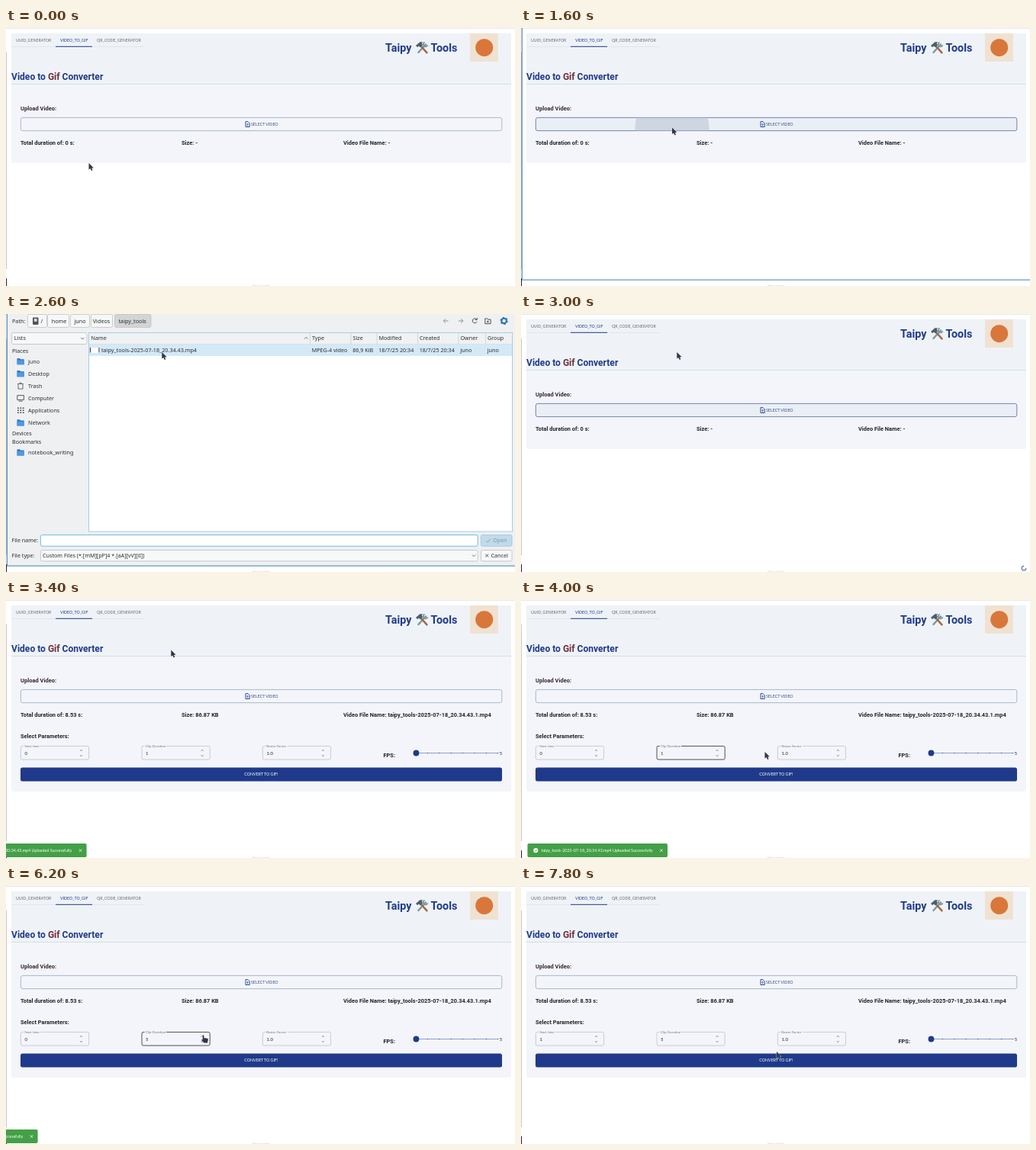
Recreate the animation shown at these times as an HTML page. Size 667 by 338 pixels, loop 8000 ms.

```html
<!DOCTYPE html>
<html lang="en">
<head>
<meta charset="utf-8">
<title>Video to Gif Converter</title>
<style>
html, body { margin: 0; width: 100%; height: 100%; overflow: hidden; background: #fff; }
svg { display: block; width: 100%; height: 100%; }
text { white-space: pre; }
.lato { font-family: Lato, sans-serif; }
.bold { font-family: Roboto, sans-serif; font-weight: 700; }
.dlg { font-family: "Noto Sans", sans-serif; font-size: 7.2px; fill: #2b2f33; }
</style>
</head>
<body>
<svg id="stage" viewBox="0 0 667 338" preserveAspectRatio="none"></svg>
<script>
const LOOP = 8000, STEP = 200;
const NAVY = '#1f3a8a', INK = '#20242f', USER = 'juno';
const FILE = 'taipy_tools-2025-07-18_20.34.43';

const rect = (x, y, w, h, fill, more = '') =>
  `<rect x="${x}" y="${y}" width="${w}" height="${h}" fill="${fill}" ${more}/>`;
const line = (d, stroke, w = 1, more = '') =>
  `<path d="${d}" fill="none" stroke="${stroke}" stroke-width="${w}" ${more}/>`;
const shape = (d, fill, more = '') => `<path d="${d}" fill="${fill}" ${more}/>`;
const lato = (x, y, s, size, fill, more = '') =>
  `<text class="lato" x="${x}" y="${y}" font-size="${size}" fill="${fill}" ${more}>${s}</text>`;
const bold = (x, y, s, size = 7.42, fill = INK, more = '') =>
  `<text class="bold" x="${x}" y="${y}" font-size="${size}" fill="${fill}" ${more}>${s}</text>`;
const dlg = (x, y, s, more = '') => `<text class="dlg" x="${x}" y="${y}" ${more}>${s}</text>`;
const group = (id, body, more = '') => `<g id="${id}" ${more}>${body}</g>`;
const chevron = (x, y, up, size = 2, color = '#4a4f58', w = 0.8) => {
  const k = up ? -size : size;
  return line(`M${x - size} ${y - k / 2}L${x} ${y + k / 2}L${x + size} ${y - k / 2}`, color, w);
};

// Crossed hammer and wrench between the title words
const tools =
  line('M540.5 32L550 21.5', '#7d95a3', 2.4, 'stroke-linecap="round"') +
  line('M548.6 18.6A3 3 0 1 0 552.6 22.4', '#7d95a3', 1.9) +
  line('M543.5 23.5L551.5 32.4', '#a5673f', 2.5, 'stroke-linecap="round"') +
  shape('M537 23L542.6 18.2L546.5 18.6L544.8 20L546 22.6L543 25.4L541 23.6L539.2 25.2Z', '#47606d');

const header =
  rect(7, 7, 655, 66, '#eff3f7') +
  line('M7 73.5H662', '#cfe0e6') +
  line('M7 24.5H182', '#dce2ea', 0.7) +
  line('M65 24.3H113', NAVY, 1) +
  lato(13, 17.5, 'UUID_GENERATOR', 5.25, '#646a76') +
  lato(71, 17.5, 'VIDEO_TO_GIF', 5.25, NAVY) +
  lato(119, 17.5, 'QR_CODE_GENERATOR', 5.25, '#646a76') +
  bold(497, 31.2, 'Taipy', 14.4, NAVY) + tools + bold(556.5, 31.2, 'Tools', 14.4, NAVY) +
  rect(608, 7, 37, 37, '#f0e2d2') +
  '<circle cx="626.7" cy="25.7" r="11.5" fill="#d9773a"/>' +
  bold(7, 68, `Video to <tspan fill="#6b2f38">Gif</tspan> Converter`, 12.05, NAVY);

const upload =
  bold(19, 107.6, 'Upload Video:', 7.5, '#33262f') +
  rect(19.4, 117.4, 630.4, 17.2, '#f3f5fa', 'id="pick" rx="2.5" stroke-width="0.8"') +
  '<circle id="ripple" cx="198" cy="131" fill="#cdd6e1" clip-path="url(#pickClip)"/>' +
  line('M314 122.6h3l2.2 2.2v4.7h-5.2z', NAVY, 0.9) +
  line('M316.6 128.5v-3M315.3 126.6l1.3-1.3l1.3 1.3', NAVY, 0.7) +
  lato(321, 128, 'SELECT VIDEO', 5.3, '#38508f') +
  bold(19, 152.6, '', 7.42, INK, 'id="total"') +
  bold(230, 152.6, '', 7.42, INK, 'id="size"') +
  bold(442, 152.6, '', 7.42, INK, 'id="file"');

function field(id, x, label, labelWidth) {
  return rect(x + 0.4, 191.4, 89.2, 17.6, 'none', `id="${id}Box" rx="2" stroke-width="0.8"`) +
    rect(x + 4, 190.4, labelWidth, 2, '#f3f5fa') +
    lato(x + 5.3, 193.2, label, 4.5, '#737986') +
    lato(x + 5.5, 203, '', 6, INK, `id="${id}"`) +
    chevron(x + 79.5, 197, true, 1.3) + chevron(x + 79.5, 204, false, 1.3);
}

let ticks = '';
for (let x = 552; x < 645; x += 15.4) ticks += rect(x, 200, 0.9, 1, NAVY);

const params =
  bold(19, 180.6, 'Select Parameters:') +
  field('start', 19, 'Start time', 22) +
  field('clip', 177.6, 'Clip Duration', 28.5) +
  field('factor', 336, 'Resize Factor', 29) +
  bold(494.5, 206, 'FPS:') +
  line('M537 200.5H645', '#8da0c9', 1.2) + ticks +
  `<circle cx="537.5" cy="200.5" r="3.9" fill="${NAVY}"/>` +
  lato(646.8, 202.6, '5', 5.8, INK) +
  rect(19, 219.5, 631, 18, NAVY, 'rx="2.5"') +
  lato(312.3, 230.2, 'CONVERT TO GIF!', 5.3, '#fff');

const toast =
  rect(8.5, 319, 183.5, 18, '#43a047', 'rx="1.8"') +
  '<circle cx="19.3" cy="328" r="3.1" fill="#fff"/>' +
  line('M17.7 328.1l1.2 1.2l2.2-2.4', '#43a047', 0.8) +
  lato(26.5, 330, `${FILE}.mp4 Uploaded Successfully`, 5.38, '#fff') +
  line('M182.2 326.4l3.4 3.4M185.6 326.4l-3.4 3.4', '#fff', 0.8);

const folder = y =>
  shape(`M14.5 ${y - 4}h3.5l1 1.2h4.7v7h-9.2z`, '#2f78c4') +
  rect(14.5, y - 1.6, 9.2, 5.8, '#4b9be6', 'rx="0.5"');
const outlineIcon = {
  Trash: y => line(`M15.2 ${y - 2.6}h7.6M17.5 ${y - 3.8}h3M16 ${y - 2.4}v6.4h6v-6.4`, '#444a50', 0.8),
  Computer: y => line(`M14.8 ${y - 3.5}h8.6v5.8h-8.6zM16.5 ${y + 4}h5.2`, '#444a50', 0.9),
  Applications: y => [0, 3.4, 6.8].map(a => line(`M${15 + a} ${y - 3}h1.8M${15 + a} ${y}h1.8M${15 + a} ${y + 3}h1.8`, '#444a50', 1.6)).join('')
};

const crumb = (x, w, tx, s, fill = '#f6f7f8') =>
  rect(x + 0.5, 0.5, w, 17, fill, 'rx="2" stroke="#c0c3c6" stroke-width="0.8"') + dlg(tx, 11.9, s);

function drawDialog() {
  let s = rect(1, 0, 666, 330, '#eff0f1');
  s += dlg(8, 11.9, 'Path:') + crumb(28, 25, 45.5, '/') +
    rect(35, 4.5, 7.5, 9.5, '#4d5359', 'rx="1"') + '<circle cx="38.7" cy="8" r="2.2" fill="#d5d8da"/>' +
    crumb(54, 28, 59.8, 'home') + crumb(84, 25, 89.5, USER) +
    crumb(111, 28, 113.8, 'Videos') + crumb(142, 47.5, 147.5, 'taipy_tools', '#d2d4d6');

  s += line('M579.5 9h-6M576 6.3l-2.7 2.7l2.7 2.7M593 9h6M596.3 6.3l2.7 2.7l-2.7 2.7', '#83888d', 0.9) +
    line('M616.8 7.3a3 3 0 1 0 .2 2.8M617.2 5v2.6h-2.6', '#3a4046', 0.9) +
    line('M627.8 6h3l1 1.2h3.3v5.5h-7.3zM631.4 8.6v2.8M630 10h2.8', '#3a4046', 0.9) +
    '<circle cx="652.6" cy="9" r="3.2" fill="none" stroke="#2b72ad" stroke-width="2"/>' +
    '<circle cx="652.6" cy="9" r="4.4" fill="none" stroke="#2b72ad" stroke-width="1.4" stroke-dasharray="2.3 2.3"/>';

  s += rect(7.5, 24.5, 98.5, 15, '#f7f8f8', 'rx="2" stroke="#bcc0c3" stroke-width="0.8"') +
    dlg(10.8, 34.4, 'Lists') + chevron(100.3, 32, false, 2.2);
  s += dlg(8, 51, 'Places') + dlg(8, 158.8, 'Devices') + dlg(8, 170, 'Bookmarks');
  [USER, 'Desktop', 'Trash', 'Computer', 'Applications', 'Network'].forEach((name, i) => {
    const y = 62 + i * 16.05;
    s += (outlineIcon[name] || folder)(y) + dlg(29, y + 2.8, name);
  });
  s += folder(181.3) + dlg(29, 184.2, 'notebook_writing');

  s += rect(108.5, 24.5, 555, 260.5, '#fff', 'stroke="#9ccbe6" stroke-width="0.9"') +
    rect(109, 25, 554, 14.3, '#f0f1f2') + line('M109 39.5H663', '#d3d6d8', 0.7) +
    rect(109, 40, 554, 15, '#d4e9f8') + chevron(393.3, 31.5, true, 2.2);
  const columns = [
    [109, 'Name', ''], [398.5, 'Type', 'MPEG-4 video'], [452, 'Size', '86,9 KiB'],
    [486, 'Modified', '18/7/25 20:34'], [539.5, 'Created', '18/7/25 20:34'],
    [593, 'Owner', USER], [628.5, 'Group', USER]
  ];
  for (const [x, head, cell] of columns) {
    if (cell) s += line(`M${x} 25V39.5`, '#c6cacc', 0.7);
    s += dlg(x + 2.5, 34.4, head) + dlg(x + 2.2, 50, cell);
  }
  s += rect(110, 44, 12.4, 7, '#fff') + rect(110, 44, 0.9, 6.5, INK) + rect(121.5, 44, 0.9, 6.5, INK) +
    dlg(125, 50, FILE + '.mp4');

  s += dlg(7.5, 299.4, 'File name:') + dlg(7.5, 319, 'File type:') +
    rect(45.4, 289.4, 572.8, 14.8, '#fff', 'rx="2" stroke="#62b5e2" stroke-width="0.9"') +
    rect(45.4, 309.4, 572.8, 14.4, '#f7f8f8', 'rx="2" stroke="#bcc0c3" stroke-width="0.8"') +
    dlg(48, 319, 'Custom Files (*.[mM][pP]4 *.[aA][vV][iI])') + chevron(613, 316.5, false, 2.2) +
    rect(622.4, 289.4, 40.6, 14.8, '#c1dbeb', 'rx="2" stroke="#9dc3da" stroke-width="0.8"') +
    line('M629.2 297l2 2l3.6-4', '#7f95a3', 0.9) + dlg(638, 299.4, 'Open', 'style="fill:#7f95a3"') +
    rect(622.4, 309.4, 40.6, 14.4, '#f7f8f8', 'rx="2" stroke="#bcc0c3" stroke-width="0.8"') +
    line('M628.3 314.6l3.8 3.8M632.1 314.6l-3.8 3.8', '#3a4046', 0.9) + dlg(635.5, 319, 'Cancel');
  return s;
}

const edge =
  rect(0, 0, 667, 1, '#e8e9eb') + rect(0, 32, 0.9, 284, '#c3c5cb') + rect(0, 328, 1, 10, '#2a1a3c') +
  lato(322.8, 338.8, 'Taipy inside', 4.5, '#c6c6c6');
const frame = line('M1.3 0V330H667', '#3f80b8', 1.1);

const arrow = shape('M0 0V8.6L2 7L3.5 10L5 9.3L3.7 6.4L6.2 6.2Z', '#34344a',
  'stroke="#eef0f4" stroke-width="0.6" paint-order="stroke"');
const hand = shape('M0.6 0Q2-.8 2.4.8V3.4L7 4.3Q8 4.6 7.8 6L7 10H2.6L-.9 6.4Q-.6 5 .8 5.8Z', '#34344a',
  'stroke="#eef0f4" stroke-width="0.6" paint-order="stroke"');

document.getElementById('stage').innerHTML =
  '<defs><clipPath id="pickClip"><rect x="19.8" y="117.8" width="629.6" height="16.4" rx="2"/></clipPath></defs>' +
  rect(0, 0, 667, 338, '#fff') +
  rect(7, 7, 655, 170, '#f3f5fa', 'id="panel" rx="3"') +
  header + upload + group('params', params) + edge +
  `<path id="spinner" d="M3 0A3 3 0 1 1 0 -3" fill="none" stroke="${NAVY}" stroke-width="0.9"/>` +
  group('toast', toast) + group('dialog', drawDialog()) + group('frame', frame) +
  group('cursor', group('arrow', arrow) + group('hand', hand));

const el = {};
document.querySelectorAll('[id]').forEach(n => el[n.id] = n);

const set = (id, attrs) => { for (const k in attrs) el[id].setAttribute(k, attrs[k]); };
const show = (id, on) => el[id].style.display = on ? '' : 'none';
const clamp = v => Math.max(0, Math.min(1, v));
const ease = v => v * v * (3 - 2 * v);

// Pointer stops: time, x, y
const path = [
  [900, 108.5, 177], [1450, 198, 130.5], [1750, 198, 130.5], [2450, 204.3, 50],
  [3250, 204.3, 50], [4000, 319.5, 199], [4600, 257, 195.5], [6300, 257, 195.5],
  [6850, 97.5, 195.5], [7250, 97.5, 195.5], [7800, 335, 217]
];
function pointer(t) {
  let i = path.findIndex(p => p[0] > t);
  if (i === 0) return path[0].slice(1);
  if (i < 0) return path[path.length - 1].slice(1);
  const [t0, x0, y0] = path[i - 1], [t1, x1, y1] = path[i];
  const k = ease((t - t0) / (t1 - t0));
  return [x0 + (x1 - x0) * k, y0 + (y1 - y0) * k];
}

const clicks = [4800, 5200, 5400, 5800];

function draw(t) {
  const loaded = t >= 3400, open = t >= 1800 && t < 3000;
  const active = t >= 1400 && t < 3400;
  set('panel', { height: loaded ? 244 : 170 });
  set('pick', { fill: active ? '#eaeff5' : '#f3f5fa', stroke: active ? '#56699a' : '#9aa7bd' });
  set('ripple', { r: t >= 1500 && t < 1800 ? (t - 1500) * 0.485 : 0 });
  el.total.textContent = `Total duration of: ${loaded ? '8.53' : '0'} s:`;
  el.size.textContent = `Size: ${loaded ? '86.87 KB' : '-'}`;
  el.file.textContent = `Video File Name: ${loaded ? FILE + '.1.mp4' : '-'}`;

  show('params', loaded);
  el.start.textContent = t >= 7200 ? 1 : 0;
  el.clip.textContent = 1 + clicks.filter(c => t >= c).length;
  el.factor.textContent = '1.0';
  const border = on => ({ stroke: on ? '#24262e' : '#bcc2cc' });
  set('startBox', border(t >= 6800 && t < 7600));
  set('clipBox', border(t >= 3800 && t < 6600));
  set('factorBox', border(false));

  // The toast slides in from the left and out again
  const out = clamp((t - 6090) / 120), into = ease(clamp((t - 3280) / 225));
  const shift = -192 * (1 - into) - 179 * out * out - (t > 6200 ? 20 : 0);
  set('toast', { transform: `translate(${shift.toFixed(1)} 0)` });

  show('spinner', t >= 3000 && t < 3400);
  set('spinner', { transform: `translate(659 333) rotate(${(t - 3000) * 0.26})` });
  show('dialog', open);
  show('frame', t >= 1600 && t < 3000);

  const [x, y] = pointer(t);
  const overSpin = (t >= 4600 && t < 6400) || (t >= 6800 && t < 7400);
  show('arrow', !overSpin);
  show('hand', overSpin);
  set('cursor', { transform: `translate(${x.toFixed(2)} ${y.toFixed(2)})` });
}

const begin = performance.now();
function tick() {
  const t = (performance.now() - begin) % LOOP;
  draw(Math.floor(t / STEP) * STEP);
  requestAnimationFrame(tick);
}
tick();
</script>
</body>
</html>
```
